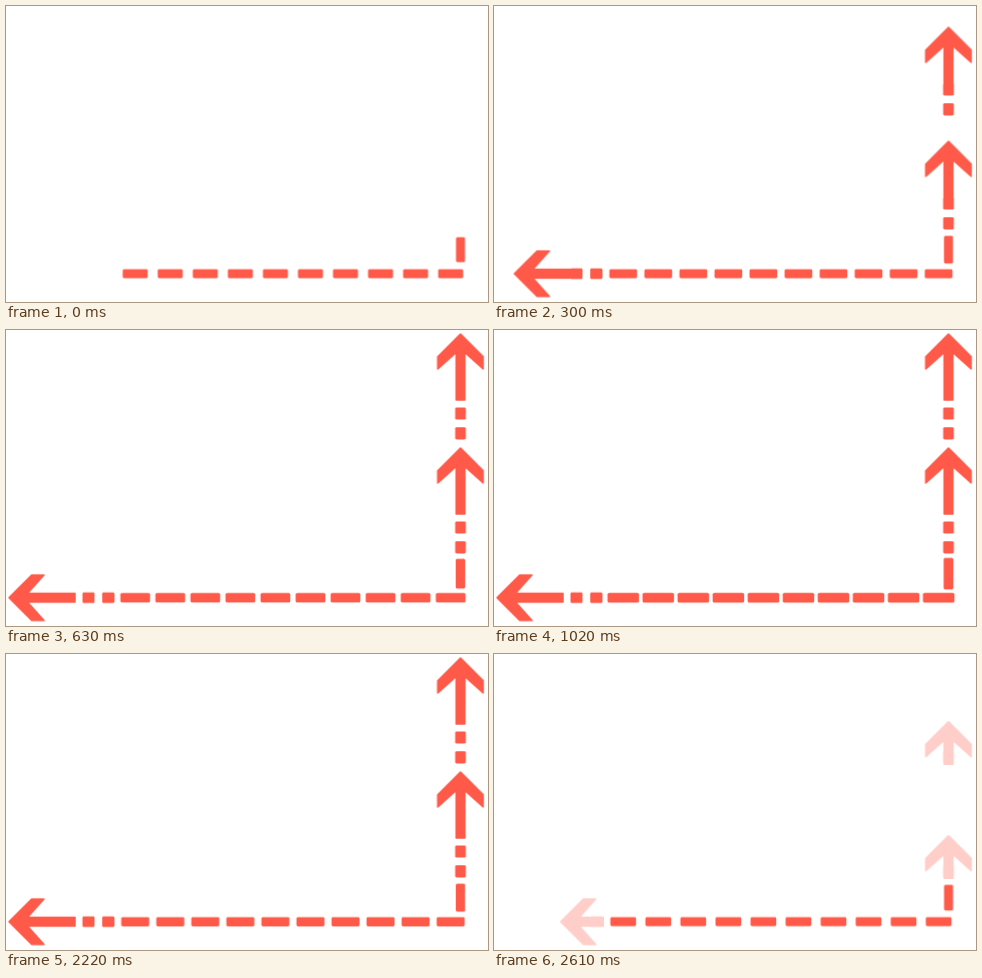
An HTML page that plays this animation: 482 px wide and 296 px high, repeating every 2640 ms.

```html
<!DOCTYPE html>
<html lang="en">
<head>
<meta charset="utf-8">
<title>Dashed arrows</title>
<style>
  html, body { margin: 0; width: 100%; height: 100%; overflow: hidden; background: #fff; }
  svg { display: block; fill: #ff5a49; }
  .dash { transform-box: fill-box; transform-origin: center; }
  .head { stroke: #ff5a49; stroke-width: 1.6; stroke-linejoin: round; }
</style>
</head>
<body>
<svg width="482" height="296" viewBox="0 0 482 296">
  <defs>
    <clipPath id="reveal"><rect x="-30" y="-10" width="60" height="118"/></clipPath>
  </defs>
</svg>
<script>
const LOOP = 2640, STEP = 30, TRAVEL = 65;
const svg = document.querySelector('svg');
const tracks = [];

function add(parent, tag, attrs) {
  const el = document.createElementNS('http://www.w3.org/2000/svg', tag);
  for (const key in attrs) el.setAttribute(key, attrs[key]);
  return parent.appendChild(el);
}

// Rows are [time in ms, value, easing to the next row].
function track(el, prop, rows) {
  const frames = rows.map(([time, value, easing = 'linear']) =>
    ({ offset: time / LOOP, [prop]: value, easing }));
  const anim = el.animate(frames, { duration: LOOP, iterations: Infinity });
  anim.pause();
  tracks.push(anim);
}

const growth = [
  [0, 25, 8.8], [300, 27.7, 9.2], [630, 29.7, 9.6], [1020, 31.5, 9.9],
  [1830, 31.2, 9.9], [2220, 28, 9.3], [2610, 25.7, 8.9], [2640, 25, 8.8]
];

function dash(cx, cy, turn) {
  const g = add(svg, 'g', { transform: `translate(${cx} ${cy}) rotate(${turn})` });
  const bar = add(g, 'rect', { class: 'dash', x: -12.5, y: -4.4, width: 25, height: 8.8, rx: 1.4 });
  track(bar, 'transform', growth.map(([time, len, thick]) =>
    [time, `scale(${len / 25}, ${thick / 8.8})`]));
}

// Drawn pointing up, with the resting tip at the local origin.
function arrow(x, y, turn) {
  const g = add(svg, 'g', {
    transform: `translate(${x} ${y}) rotate(${turn})`, 'clip-path': 'url(#reveal)'
  });
  const fade = add(g, 'g', {});
  for (const top of [74.4, 94.2])
    add(fade, 'rect', { x: -5.3, y: top, width: 10.6, height: 12.2, rx: 1.4 });
  const head = add(fade, 'path', {
    class: 'head',
    d: 'M0 1L22.7 23.7V36L4.3 19.5V67H-4.3V19.5L-22.7 36V23.7Z'
  });
  const away = `translateY(${TRAVEL}px)`, home = 'translateY(0px)';
  track(head, 'transform', [
    [0, away, 'cubic-bezier(.44,0,.5,1.21)'], [540, home],
    [2250, home, 'cubic-bezier(.42,0,.7,1)'], [LOOP, away]
  ]);
  track(fade, 'opacity', [[0, 0], [100, 1], [2540, 1], [LOOP, 0]]);
}

arrow(454.5, 3, 0);
arrow(454.5, 117, 0);
arrow(2, 267.7, -90);
for (let i = 0; i < 10; i++) dash(129.2 + i * 35.05, 267.7, 0);
dash(454.5, 243.7, 90);

function draw() {
  const t = Math.floor(performance.now() % LOOP / STEP) * STEP;
  for (const anim of tracks) anim.currentTime = t;
  requestAnimationFrame(draw);
}
draw();
</script>
</body>
</html>
```
